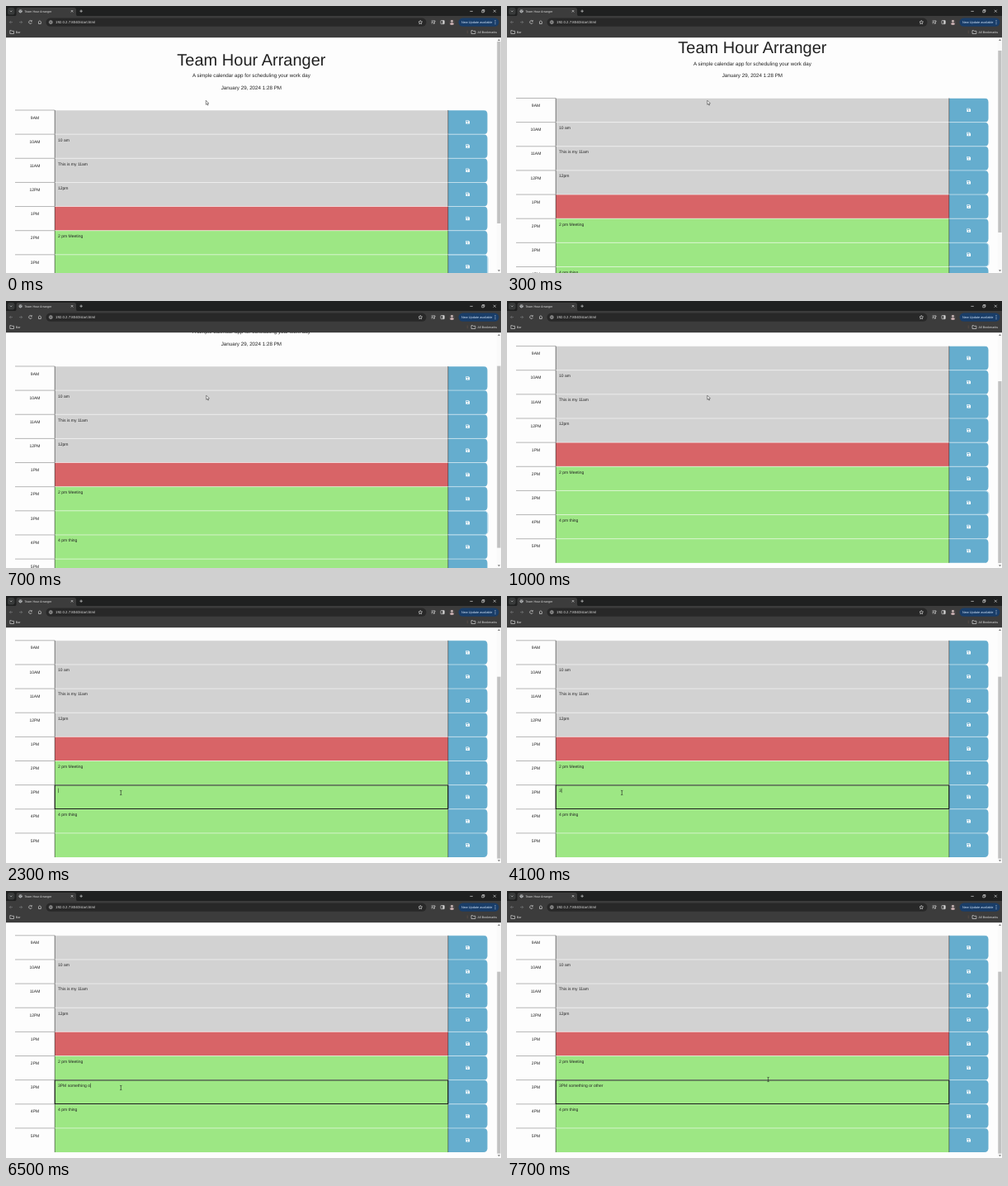
An HTML page that plays this animation: 600 px wide and 323 px high, repeating every 8000 ms.

```html
<!DOCTYPE html>
<html lang="en">
<head>
<meta charset="utf-8">
<title>Team Hour Arranger</title>
<style>
html, body { margin: 0; width: 100%; height: 100%; overflow: hidden; background: #fff; }
svg { display: block; width: 600px; height: 323px; }
text { font-family: "Liberation Sans", Arial, sans-serif; text-rendering: geometricPrecision; white-space: pre; }
.line { fill: none; stroke: #d2d2d2; stroke-width: .7; }
.dim { stroke: #77797a; }
</style>
</head>
<body>
<svg id="stage" viewBox="0 0 600 323">
  <rect width="600" height="323" fill="#fdfdfd"/>
  <g id="page"></g>

  <g id="scrollbar">
    <rect x="594.6" y="38" width="5.4" height="285" fill="#fafafa"/>
    <path d="M596 42l1.5-2 1.5 2z" fill="#777"/>
    <path d="M596 319.3l1.5 2 1.5-2z" fill="#777"/>
    <rect id="thumb" x="595.3" y="43" width="4.2" height="220" fill="#c1c1c1"/>
  </g>

  <g id="browser">
    <rect width="600" height="13" fill="#1f2020"/>
    <rect y="12" width="600" height="26.2" fill="#3c3c3c"/>
    <rect x="2" y="2" width="8.5" height="8.5" rx="2.6" fill="#383a3a"/>
    <path class="line" d="M5 5.7l1.2 1.2 1.2-1.2"/>
    <path d="M10 12.2q2.5 0 2.5-2.5V4.5q0-2.5 2.5-2.5h67.5q2.5 0 2.5 2.5v5.2q0 2.5 2.5 2.5z" fill="#3c3c3c"/>
    <circle cx="17.6" cy="6.3" r="2.1" fill="#b9bcbe"/>
    <path d="M16 5.8l1.5.2.6 1.4-.8.8M17.7 4.6l.5.9 1.2.1" fill="none" stroke="#3c3c3c" stroke-width=".5"/>
    <path class="line" d="M78.8 5l2.5 2.5m0-2.5l-2.5 2.5M89.4 6.2h3.4m-1.7-1.7v3.4"/>
    <path class="line" d="M562.4 6.4h3.4M576.8 5.4h2.4v2.4h-2.4zM577.5 5.2v-.7h2.4v2.5h-.6M590.8 4.7l3 3m0-3l-3 3"/>

    <path class="line dim" d="M8 19.6H4.3m1.7-1.7l-1.7 1.7 1.7 1.7M16 19.6h3.7m-1.7-1.7l1.7 1.7-1.7 1.7"/>
    <path class="line" d="M31 18.3a1.9 1.9 0 1 0 .3 1.9M31.3 17.2v1.4h-1.5M39 19.4l1.9-1.7 1.9 1.7M39.5 19.2v2.3h2.8v-2.3"/>
    <rect x="48.5" y="14.4" width="461" height="10.4" rx="5.2" fill="#282828"/>
    <circle cx="54.3" cy="19.6" r="2.9" fill="#3c3c3c"/>
    <circle class="line" cx="54.3" cy="19.6" r="1.7"/>
    <path class="line" d="M54.3 19.4v1.1M54.3 18.4v.4" stroke-width=".5"/>
    <path class="line" stroke-linejoin="round" d="M502.3 17.4l.7 1.5 1.6.2-1.2 1.1.3 1.6-1.4-.8-1.4.8.3-1.6-1.2-1.1 1.6-.2z"/>
    <path class="line" d="M515.6 17.9h4.5M515.6 19.4h2.4M515.6 20.9h1.7M519.4 21v-2.5h1.2"/>
    <circle cx="518.8" cy="21" r=".8" fill="#d2d2d2"/>
    <rect class="line" x="527" y="17.5" width="4.2" height="4.2" rx=".5"/>
    <rect x="529.3" y="17.5" width="2" height="4.2" fill="#d2d2d2"/>
    <circle cx="540.5" cy="19.6" r="3.4" fill="#4a4546"/>
    <circle cx="540.5" cy="18.3" r="1.3" fill="#d4c4c2"/>
    <path d="M538 21.9q.4-2 2.5-2t2.5 2q-1 1-2.5 1t-2.5-1z" fill="#c8aeb0"/>
    <rect x="548.5" y="14.4" width="49" height="10.4" rx="5.2" fill="#193d68"/>
    <path d="M593 17.2v4.9" stroke="#d5e5f8" stroke-width=".9" stroke-dasharray=".9 1.1"/>

    <path class="line" d="M4.8 29.6h1.7l.6.7h2.4v3.2H4.8zM564 29.6h1.7l.6.7h2.6v3.2H564z"/>
    <path d="M559.2 29.5v3.8" stroke="#6b5650" stroke-width=".6"/>
  </g>

  <path id="arrow" d="M0 0V5.1L1.2 4 2 5.9 2.8 5.6 2 3.7H3.6Z" fill="#fff" stroke="#222" stroke-width=".5"/>
  <path id="beam" d="M-1.1-2.7Q0-2.7 0-2 0-2.7 1.1-2.7M0-2.2V2.2M-1.1 2.7Q0 2.7 0 2 0 2.7 1.1 2.7" fill="none" stroke="#222" stroke-width=".6"/>
</svg>
<script>
const NS = "http://www.w3.org/2000/svg";
const $ = id => document.getElementById(id);
const page = $("page"), browser = $("browser");

function add(parent, tag, attrs, content) {
  const el = document.createElementNS(NS, tag);
  for (const key in attrs) el.setAttribute(key, attrs[key]);
  if (content !== undefined) el.textContent = content;
  parent.appendChild(el);
  return el;
}

function label(parent, x, y, size, content, fill = "#222", anchor = "start") {
  return add(parent, "text", { x, y, "font-size": size, fill, "text-anchor": anchor }, content);
}

// Browser labels
const pale = "#dcdcdc";
label(browser, 22.5, 7.7, 3.65, "Team Hour Arranger", pale);
label(browser, 60, 21.2, 4.35, "192.0.2.7:8040/start.html", pale);
label(browser, 552, 21, 3.85, "New Update available", "#cfe2f8");
label(browser, 11.8, 32.9, 3.7, "Bar", pale);
label(browser, 571.6, 32.9, 3.7, "All Bookmarks", pale);

// Page header
label(page, 297.4, 71.7, 20, "Team Hour Arranger", "#222", "middle");
label(page, 297.4, 86.4, 6.25, "A simple calendar app for scheduling your work day", "#222", "middle");
label(page, 297.4, 100.7, 6.25, "January 29, 2024 1:28 PM", "#222", "middle");

// Schedule
const TOP = 126, PITCH = 29.14;
const PAST = "#d2d2d2", PRESENT = "#d86467", FUTURE = "#9de784", BLUE = "#65adce";
const rows = [
  ["9AM", "", PAST], ["10AM", "10 am", PAST], ["11AM", "This is my 11am", PAST],
  ["12PM", "12pm", PAST], ["1PM", "", PRESENT], ["2PM", "2 pm Meeting", FUTURE],
  ["3PM", "", FUTURE], ["4PM", "4 pm thing", FUTURE], ["5PM", "", FUTURE]
];
const entries = rows.map(([hour, entry, color], i) => {
  const y = TOP + i * PITCH, end = y + PITCH;
  add(page, "path", { d: `M11 ${y}H59`, stroke: "#858585", "stroke-width": .6 });
  label(page, 35, y + 10.7, 5, hour, "#222", "middle");
  add(page, "rect", { x: 59, y, width: 477, height: PITCH, fill: color });
  add(page, "path", {
    d: `M536 ${y}H578.8Q583.5 ${y} 583.5 ${y + 4.7}V${end - 4.7}Q583.5 ${end} 578.8 ${end}H536Z`, fill: BLUE
  });
  add(page, "path", { d: `M59 ${y}H581`, stroke: "#fff", "stroke-width": .65, opacity: .8 });
  add(page, "path", { d: `M59.2 ${y}V${end}M535.8 ${y}V${end}`, stroke: "#333", "stroke-width": .6 });
  const cy = y + 14.4;
  add(page, "path", { d: `M557.4 ${cy - 2.2}h3.3l1.3 1.3v3.1h-4.6z`, fill: "#fff" });
  add(page, "path", { d: `M558.1 ${cy - 1.6}h2.4v1.1h-2.4z`, fill: BLUE });
  add(page, "circle", { cx: 559.7, cy: cy + .9, r: .7, fill: BLUE });
  return label(page, 63, y + 8.4, 5, entry);
});

const editY = TOP + 6 * PITCH;
const glow = add(page, "path", {
  d: `M536 ${editY + .3}H579Q584 ${editY + .3} 584 ${editY + 5}V${editY + 24.2}Q584 ${editY + 28.8} 579 ${editY + 28.8}H536`,
  fill: "none", stroke: "#a9d4e8", "stroke-width": 1
});
const outline = add(page, "rect", {
  x: 59.2, y: editY + .3, width: 476.6, height: PITCH - .6, fill: "none", stroke: "#111", "stroke-width": .95
});
const caret = add(page, "rect", { y: editY + 3.9, width: .45, height: 5.6, fill: "#111" });

const STEP = 100, LOOP = 8000, FOCUS = 22;
const TYPED = "3PM something or other";

function scrollAt(n) {
  return n < 3 ? 14.5 * (n / 3) ** 2 : Math.min(72.2, 14.5 + 8.13 * (n - 3));
}

function typedCount(n) {
  if (n < 41) return 0;
  if (n < 55) return Math.min(3, n - 40);
  if (n < 64) return 3 + Math.ceil((n - 54) * 10 / 9);
  return Math.min(TYPED.length, n - 50);
}

function caretOn(n) {
  if (n < FOCUS || n > 76) return false;
  return n > 50 || Math.floor((n - 21) / 5) % 2 === 0;
}

function pointerAt(n) {
  if (n < 20) return [n < 2 ? 242.3 : 242.8, 114.2];
  if (n < 23) return [[225, 140], [180, 198], [148, 232]][n - 20];
  if (n < 76) return [139.3, 238];
  return n < 77 ? [232, 232] : [316.6, 228];
}

const show = (el, on) => el.setAttribute("visibility", on ? "visible" : "hidden");
const move = (el, x, y) => el.setAttribute("transform", `translate(${x} ${y})`);

function render(time) {
  const n = Math.floor(time % LOOP / STEP);
  const scroll = scrollAt(n), focused = n >= FOCUS;
  move(page, 0, -scroll);
  $("thumb").setAttribute("y", 43 + scroll * .757);

  entries[6].textContent = TYPED.slice(0, typedCount(n));
  caret.setAttribute("x", 63.1 + entries[6].getComputedTextLength());
  show(caret, caretOn(n));
  show(outline, focused);
  show(glow, !focused);

  const [x, y] = pointerAt(n), overText = n >= 20;
  move($("arrow"), x, y);
  move($("beam"), x, y);
  show($("arrow"), !overText);
  show($("beam"), overText);
}

const start = performance.now();
function tick() {
  render(performance.now() - start);
  requestAnimationFrame(tick);
}
tick();
</script>
</body>
</html>
```
